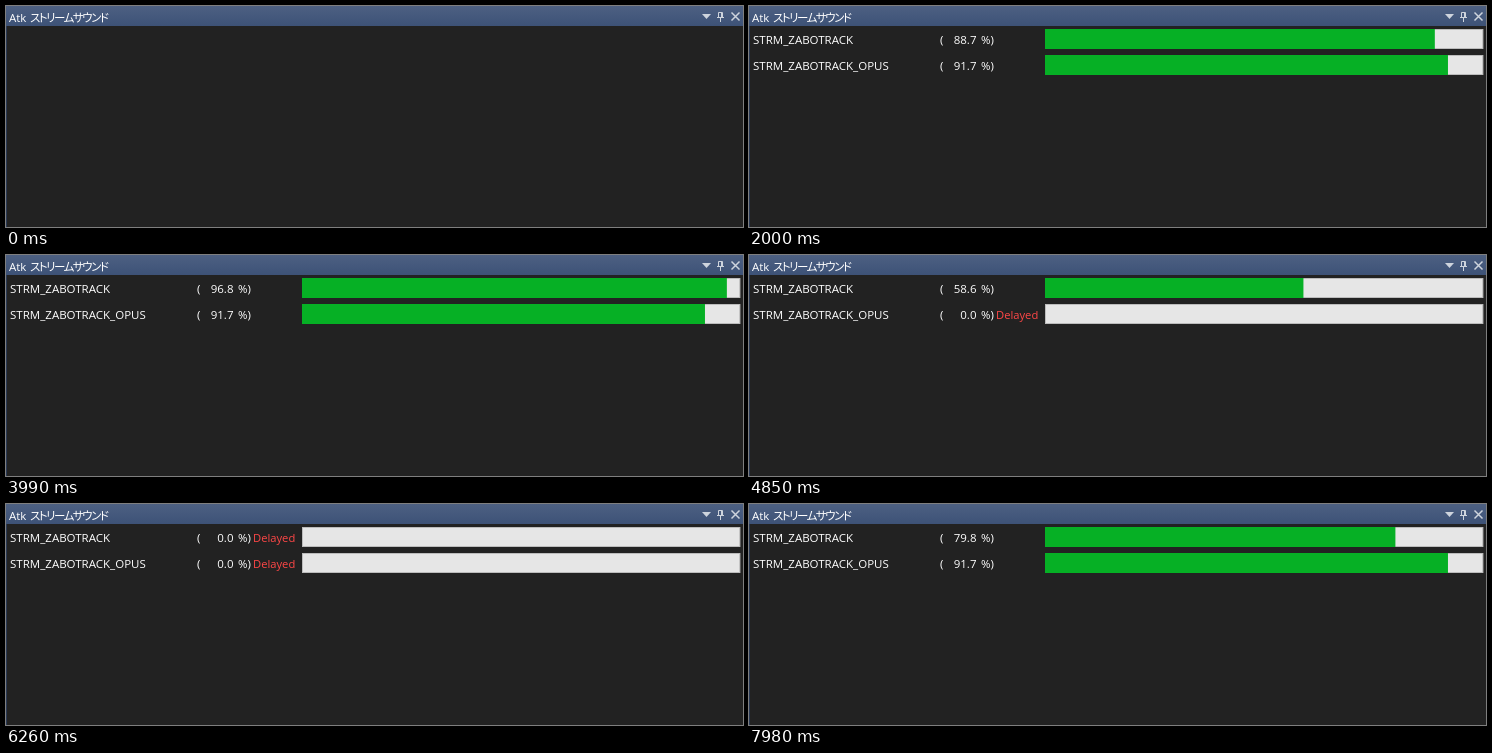
Recreate the animation shown at these times as an HTML page. Size 737x221 px, loop 8 s.

```html
<!DOCTYPE html>
<html lang="ja">
<head>
<meta charset="utf-8">
<title>Stream sound monitor</title>
<style>
  html, body { margin: 0; width: 100%; height: 100%; overflow: hidden; background: #222; }
  svg { display: block; }
  text { font: 500 11.5px "Open Sans", "Noto Sans", sans-serif; fill: #fff; white-space: pre; }
  .kana { font: 11.5px "Noto Sans CJK JP", "Noto Sans CJK", sans-serif; font-feature-settings: "palt"; letter-spacing: -1.5px; }
  .value { text-anchor: end; }
  .late { fill: #ff4747; font-size: 11.2px; font-weight: 400; }
</style>
</head>
<body>
<svg width="737" height="221" viewBox="0 0 737 221">
  <defs>
    <linearGradient id="bar" x2="0" y2="1">
      <stop stop-color="#4d6082"/><stop offset="1" stop-color="#3d5277"/>
    </linearGradient>
  </defs>
  <rect width="737" height="221" fill="#222"/>
  <path d="M.5 20V221" stroke="#293955"/>
  <rect width="737" height="20" fill="url(#bar)"/>
  <text x="3" y="15.5">Atk <tspan class="kana" x="24">ストリームサウンド</tspan></text>
  <path d="M696 8h9l-4.5 5z" fill="#ced4dd"/>
  <path d="M712.5 11V6.5h4V11M715.5 6.5V11M711 11.5h7M714.5 12v4" fill="none" stroke="#ced4dd"/>
  <path d="M725.5 6.5l8 8m0-8l-8 8" stroke="#ced4dd" stroke-width="1.5"/>
  <g id="rows"></g>
</svg>
<script>
// Times in ms
const LOOP = 8000, SHOW = 760, STALL = 3980, RESUME = 7440;
const REFRESH = 86, FIRST_REFRESH = 800;
const rowsEl = document.getElementById('rows');

const rows = ['STRM_ZABOTRACK', 'STRM_ZABOTRACK_OPUS'].map((name, i) => {
  const g = document.createElementNS('http://www.w3.org/2000/svg', 'g');
  g.setAttribute('transform', `translate(0 ${23 + 26 * i})`);
  g.innerHTML = `<text x="4" y="15">${name}</text>
    <text x="191" y="15">(</text><text class="value" x="227.5" y="15"></text>
    <text x="232" y="15">%)</text><text class="late" x="247" y="15">Delayed</text>
    <rect x="296.5" y=".5" width="437.4" height="19" fill="#e6e6e6" stroke="#bcbcbc"/>
    <rect class="fill" x="296" height="20" fill="#06b025"/>`;
  rowsEl.append(g);
  const [value, late, fill] = ['.value', '.late', '.fill'].map(s => g.querySelector(s));
  return { value, late, fill };
});

// Falls steadily; a 20 % block is loaded back each time until loading stalls
function streamLevel(age) {
  const used = Math.max(0, age * .0445);
  const loads = Math.min(7, Math.max(0, Math.floor((used - .5) / 20)));
  return Math.min(99.9, Math.max(0, 100 - used + 20 * loads));
}

// Smaller buffer of 48 packets, drained quickly once loading stalls
function opusLevel(age, stalled) {
  const packets = age < 380 ? 47 : 44 - Math.floor(Math.max(0, stalled) / 19.5);
  return Math.max(0, packets) / 48 * 100;
}

function draw(now) {
  const t = now % LOOP;
  const sampled = t - ((t - FIRST_REFRESH) % REFRESH + REFRESH) % REFRESH;
  const resumed = t >= RESUME;
  const age = sampled - (resumed ? RESUME + 45 : SHOW + 5);
  const levels = [streamLevel(age), opusLevel(age, resumed ? 0 : sampled - STALL)];

  rowsEl.style.display = t < SHOW ? 'none' : '';
  levels.forEach((level, i) => {
    const { value, late, fill } = rows[i];
    value.textContent = level.toFixed(1);
    late.style.display = level < .05 ? '' : 'none';
    fill.setAttribute('width', Math.round(level) * 4.38);
  });
}

const start = performance.now();
function frame() {
  draw(performance.now() - start);
  requestAnimationFrame(frame);
}
frame();
</script>
</body>
</html>
```
